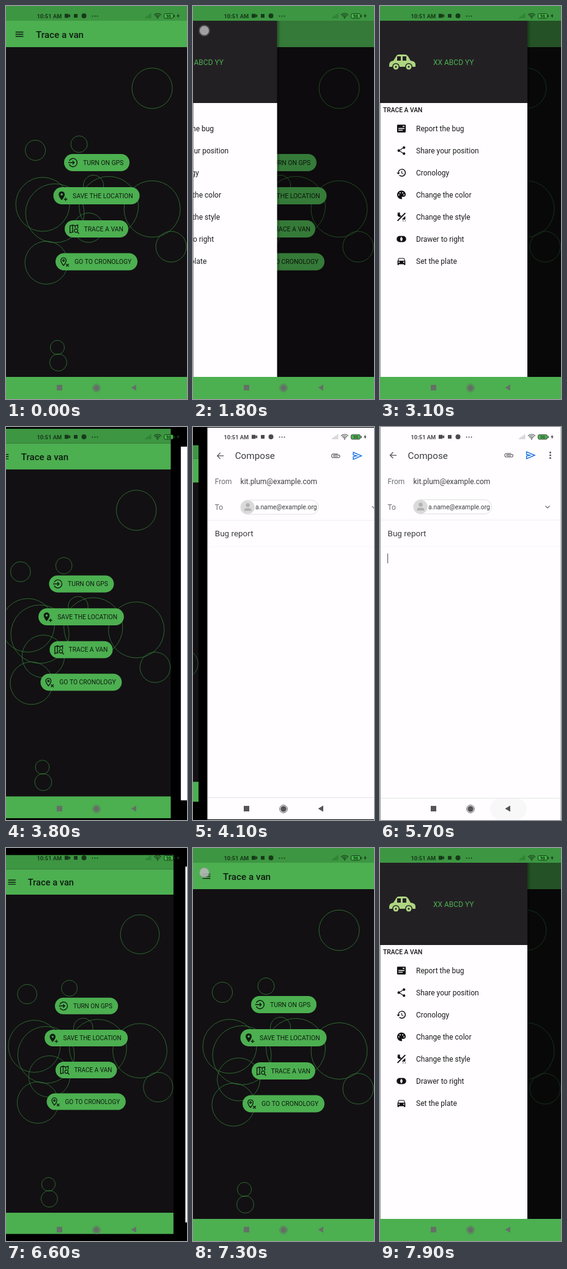
Animation, 296 px wide and 640 px high, one loop 8 s. Source, as an HTML page with a canvas:

```html
<!DOCTYPE html>
<html lang="en">
<head>
<meta charset="utf-8">
<title>Trace a van</title>
<style>
html, body { margin: 0; width: 100%; height: 100%; overflow: hidden; background: #000; }
canvas { display: block; width: 100vw; height: 100vh; }
</style>
</head>
<body>
<canvas></canvas>
<script>
const W = 296, H = 640, LOOP = 8000, STEP = 100;
const GREEN = '#4caf50', DARK = '#121013', INK = '#0f1c10';
const APP = 'Trace a van';
const canvas = document.querySelector('canvas');
const c = canvas.getContext('2d');
const ratio = Math.max(1, window.devicePixelRatio || 1);
canvas.width = W * ratio;
canvas.height = H * ratio;

const clamp = v => Math.min(1, Math.max(0, v));
const phase = (t, start, span) => clamp((t - start) / span);
const easeOut = (x, n) => 1 - (1 - x) ** n;
const smooth = x => x * x * (3 - 2 * x);

function rect(x, y, w, h, color) {
  c.fillStyle = color;
  c.fillRect(x, y, w, h);
}
function pill(x, y, w, h, r, fill, line) {
  c.beginPath();
  c.roundRect(x, y, w, h, r);
  if (fill) { c.fillStyle = fill; c.fill(); }
  if (line) { c.strokeStyle = line; c.lineWidth = 1; c.stroke(); }
}
function dot(x, y, r, color) {
  c.beginPath();
  c.arc(x, y, r, 0, 7);
  c.fillStyle = color;
  c.fill();
}
function ring(x, y, r, color, width = 1) {
  c.beginPath();
  c.arc(x, y, r, 0, 7);
  c.strokeStyle = color;
  c.lineWidth = width;
  c.stroke();
}
function text(s, x, y, size, color, weight = 400, align = 'left') {
  c.font = `${weight} ${size}px Roboto, sans-serif`;
  c.textAlign = align;
  c.fillStyle = color;
  c.fillText(s, x, y);
}
// Paths live in a 24-unit box centred on x, y.
function icon(d, x, y, size, color, line = 0) {
  c.save();
  c.translate(x - size / 2, y - size / 2);
  c.scale(size / 24, size / 24);
  const p = new Path2D(d);
  if (line) {
    c.strokeStyle = color;
    c.lineWidth = line;
    c.stroke(p);
  } else {
    c.fillStyle = color;
    c.fill(p, 'evenodd');
  }
  c.restore();
}

const ICON = {
  menu: 'M3 6h18v2H3zM3 11h18v2H3zM3 16h18v2H3z',
  back: 'M21 12H5M12 4l-8 8 8 8',
  chevron: 'M5 9l7 7 7-7',
  left: 'M15 5l-7 7 7 7',
  pin: 'M10 2a7 7 0 0 0-7 7c0 5.2 7 13 7 13s7-7.8 7-13a7 7 0 0 0-7-7zm0 9.5a2.5 2.5 0 1 1 0-5 2.5 2.5 0 0 1 0 5z',
  pinLine: 'M10 3a6 6 0 0 0-6 6c0 4.5 6 11.5 6 11.5s6-7 6-11.5a6 6 0 0 0-6-6zM10 7.5a1.8 1.8 0 1 0 .01 0z',
  plus: 'M15 20h8M19 16v8',
  cross: 'M16 17l6 6M22 17l-6 6',
  login: 'M3.5 8a9.5 9.5 0 1 1 0 8M1 12h14M11 8l4 4-4 4',
  map: 'M21 11V3l-6 2-6-2-6 2v16l6-2 2 1M9 3v16M15 5v5M17 12a4 4 0 1 0 .01 0zM20 19l4 4',
  report: 'M4 3h16a2 2 0 0 1 2 2v14a2 2 0 0 1-2 2H4a2 2 0 0 1-2-2V5a2 2 0 0 1 2-2zM5 11v2h14v-2zM5 15v2h10v-2zM15 6v2h4V6z',
  share: 'M18 16c-.8 0-1.4.3-2 .8l-7.1-4.1a3 3 0 0 0 0-1.4L16 7.2A3 3 0 1 0 15 5l.1.7L8 9.8a3 3 0 1 0 0 4.4l7.1 4.2-.1.6a3 3 0 1 0 3-3z',
  history: 'M13 3a9 9 0 0 0-9 9H1l3.9 3.9L9 12H6a7 7 0 1 1 2.1 4.9l-1.4 1.4A9 9 0 1 0 13 3zm-1 5v5l4.3 2.5.7-1.2-3.5-2.1V8z',
  palette: 'M12 2a10 10 0 0 0 0 20c1 0 1.7-.8 1.7-1.7 0-1-.9-1.2-.9-2.1 0-1 .8-1.7 1.7-1.7h2a5.5 5.5 0 0 0 5.5-5.5c0-5-4.5-9-10-9zM6 10.5a1.5 1.5 0 1 0 .01 0zM9 6a1.5 1.5 0 1 0 .01 0zM15 6a1.5 1.5 0 1 0 .01 0zM18 10.5a1.5 1.5 0 1 0 .01 0z',
  style: 'M20 2l2 2L4 22l-2-2zM9 2a5 5 0 1 0 3 8 6 6 0 0 1-3-8zM21 10v8h-8zM15 20h2v2h-2zM20 20h2v2h-2zM3 2h2v2H3z',
  compare: 'M8 5h8a7 7 0 0 1 0 14H8A7 7 0 0 1 8 5zM12 7a6 6 0 0 0 0 10 6 6 0 0 0 0-10z',
  car: 'M18.9 6c-.2-.6-.8-1-1.4-1h-11c-.7 0-1.2.4-1.4 1L3 12v8c0 .6.4 1 1 1h1c.6 0 1-.4 1-1v-1h12v1c0 .6.4 1 1 1h1c.6 0 1-.4 1-1v-8zM5 11l1.5-4.5h11L19 11zM6.5 13a1.5 1.5 0 1 0 .01 0zM17.5 13a1.5 1.5 0 1 0 .01 0z',
  clip: 'M17 7.5H6a4.5 4.5 0 0 0 0 9h12.5a3.2 3.2 0 0 0 0-6.5H8a1.8 1.8 0 0 0 0 3.6h9',
  send: 'M3 4l19 8-19 8v-6l8-2-8-2z',
  video: 'M2 5h14v5l6-4v12l-6-4v5H2z',
  bolt: 'M14 1L5 14h6l-1 9 9-13h-6z',
  shift: 'M12 2L2 13h5v8h10v-8h5z',
  erase: 'M8 4h14v16H8l-6-8zM11 9l6 6M17 9l-6 6',
  enter: 'M20 6v6H5M9 7l-5 5 5 5',
  mic: 'M12 2a3 3 0 0 0-3 3v7a3 3 0 0 0 6 0V5a3 3 0 0 0-3-3zM5 11h2a5 5 0 0 0 10 0h2a7 7 0 0 1-6 7v4h-2v-4a7 7 0 0 1-6-7z',
  board: 'M5 4h14v17H5zM9 2h6v4H9zM8 10h8M8 14h8M8 18h5',
  sticker: 'M3 3h18v11l-7 7H3zM21 14h-7v7M8 8v2M15 8v2M7 13q4 4 8 0',
  globe: 'M12 2a10 10 0 1 0 .01 0zM12 2q-9 10 0 20 9-10 0-20M3 9h18M3 15h18',
  smile: 'M12 2a10 10 0 1 0 .01 0zM8 8v2M16 8v2M7 14q5 6 10 0'
};

const BUBBLES = [
  [239, 134, 33], [48, 235, 16.5], [119.5, 225, 13.5], [143, 292, 16.5],
  [60, 323, 44], [80, 337.5, 48], [168, 326, 48.5], [239, 330.5, 46],
  [66, 418, 35], [270, 392, 25], [84, 556, 11.5], [85.5, 580.5, 14]
];
const BUTTONS = [
  [95, 255, 107, 'Turn on GPS', 126, ['login']],
  [77.5, 309, 141, 'Save the location', 109, ['pin', 'plus']],
  [96, 363, 104, APP, 127.5, ['map']],
  [81, 416.5, 134, 'Go to cronology', 112, ['pinLine', 'cross']]
];
const ITEMS = [
  ['report', 'Report the bug'], ['share', 'Share your position'],
  ['history', 'Cronology'], ['palette', 'Change the color'],
  ['style', 'Change the style'], ['compare', 'Drawer to right'],
  ['car', 'Set the plate']
];

// The app is paused while the mail screen covers it.
function driftingBubble(t) {
  const away = clamp((t - 3800) / 2800) * 2800;
  const k = Math.max(0, t - 600 - away) / 3200;
  return [135 - 49.5 * k, 361 + 13 * k, 24 + 11 * Math.min(k, 1)];
}

function drawHeader() {
  rect(0, 24, 241, 134, '#232024');
  const body = '#aed581';
  c.beginPath();
  c.moveTo(15, 98);
  c.quadraticCurveTo(14, 90, 22, 89);
  c.lineTo(27, 81);
  c.quadraticCurveTo(28, 79, 31, 79);
  c.lineTo(41, 79);
  c.quadraticCurveTo(44, 79, 46, 82);
  c.lineTo(50, 89);
  c.quadraticCurveTo(58, 90, 58, 95);
  c.lineTo(58, 99);
  c.lineTo(15, 99);
  c.fillStyle = body;
  c.fill();
  rect(28, 82, 6, 7, '#232024');
  rect(37, 82, 6, 7, '#232024');
  for (const x of [26, 47]) {
    dot(x, 99, 6, '#232024');
    dot(x, 99, 4.5, body);
    dot(x, 99, 1.5, '#232024');
  }
  text('XX ABCD YY', 87, 95.5, 12, GREEN);
}

function drawDrawer(open) {
  if (!open) return;
  rect(0, 24, W, 580, `rgba(0,0,0,${0.53 * open})`);
  c.save();
  c.beginPath();
  c.rect(0, 24, W, 580);
  c.clip();
  c.translate(241 * (open - 1), 0);
  const shade = c.createLinearGradient(241, 0, 247, 0);
  shade.addColorStop(0, 'rgba(0,0,0,.3)');
  shade.addColorStop(1, 'rgba(0,0,0,0)');
  rect(241, 24, 6, 580, shade);
  rect(0, 158, 241, 446, '#fffdff');
  drawHeader();
  text(APP.toUpperCase(), 5, 173, 10.3, '#151515', 500);
  ITEMS.forEach(([name, label], i) => {
    const y = 199.5 + 36 * i;
    icon(ICON[name], 35, y, 17, '#111');
    text(label, 59, y + 4, 12, '#1c1c1c');
  });
  c.restore();
  rect(0, 158, 1, 446, '#999');
}

function drawApp(t, open) {
  rect(0, 0, W, H, DARK);
  [...BUBBLES, driftingBubble(t)].forEach(b => ring(...b, '#37873b', 0.75));
  for (const [x, y, w, label, tx, parts] of BUTTONS) {
    pill(x, y - 14, w, 28, 14, GREEN);
    parts.forEach(p => icon(ICON[p], tx - 16.5, y, 17, INK, p === 'pin' ? 0 : 2));
    text(label.toUpperCase(), tx, y + 3.7, 10.4, INK);
  }
  rect(0, 24, W, 43, GREEN);
  icon(ICON.menu, 22, 46, 17, INK);
  text(APP, 49, 51.5, 15.2, INK, 500);
  drawDrawer(open);
  rect(0, 0, W, 24, '#3d9642');
  rect(0, 604, W, 36, GREEN);
}

const ROWS = [
  ['1234567890', '', 17, 445],
  ['QWERTYUIOP', '%\\|=[]<>{}', 17, 480],
  ['ASDFGHJKL', '@#$_&-+()', 31.5, 516],
  ['ZXCVBNM', '*"\':;!?', 60, 552]
];

function drawKeyboard(up) {
  if (!up) return;
  const pale = '#bcd4f2';
  c.save();
  c.beginPath();
  c.rect(0, 0, W, 604);
  c.clip();
  c.translate(0, 218 * (1 - up));
  rect(0, 386, W, 218, '#1565c0');
  rect(0, 386, W, 34, '#0d47a1');
  dot(19, 403, 11.5, '#fff');
  icon(ICON.left, 19, 403, 13, '#123f86', 2.5);
  icon(ICON.sticker, 58, 403, 14, pale, 2.2);
  text('GIF', 100, 406.5, 10.5, pale, 700, 'center');
  icon(ICON.board, 143, 403, 15, pale, 2.2);
  for (let i = 0; i < 8; i++) {
    const a = i * Math.PI / 4;
    dot(185.5 + 4.7 * Math.cos(a), 403 + 4.7 * Math.sin(a), 1.6, pale);
  }
  ring(185.5, 403, 3.5, pale, 2.6);
  rect(211, 394, 1, 18, 'rgba(255,255,255,.15)');
  for (const x of [233, 238, 243]) dot(x, 403, 1.5, pale);
  icon(ICON.mic, 280, 402.5, 16, pale);
  for (const [keys, hints, x0, y] of ROWS) {
    [...keys].forEach((key, i) => {
      const x = x0 + 29.1 * i;
      text(key, x, y, 17, '#fff', 400, 'center');
      if (hints) text(hints[i], x + 8.5, y - 13, 9, '#dbe7f8', 400, 'center');
    });
  }
  icon(ICON.shift, 24, 546, 18, pale);
  icon(ICON.erase, 271, 546, 19, pale, 2);
  text('?123', 11.5, 586, 11, pale, 500);
  icon(ICON.smile, 60.5, 576, 9, pale, 2);
  text(',', 60.5, 589, 13, pale, 500, 'center');
  icon(ICON.globe, 89, 582, 17, pale, 1.7);
  pill(111, 573, 102, 19, 2, 'rgba(255,255,255,.45)');
  text('EN • HR • IT', 162, 586, 9.5, '#fff', 400, 'center');
  text('.', 235, 587, 14, pale, 500, 'center');
  pill(256, 571.5, 32, 22, 11, '#2196f3');
  icon(ICON.enter, 272, 582.5, 15, '#fff', 2.4);
  c.restore();
}

function drawMail(t, keys) {
  const gray = '#6b6e73', ink = '#3c3d41';
  rect(0, 0, W, H, '#fffdff');
  if (t < 3900) return; // the window opens blank
  icon(ICON.back, 21.5, 46, 15, '#555', 2);
  text('Compose', 45.5, 51.5, 15.3, ink);
  icon(ICON.clip, 211, 46, 16, '#666', 1.7);
  icon(ICON.send, 246, 46, 17, '#1a73e8', 2);
  for (const y of [41.5, 46, 50.5]) dot(278.5, y, 1.5, '#555');
  text('From', 12.5, 92.5, 12, gray);
  text('kit.plum@example.com', 54.5, 92.5, 12, ink);
  text('To', 12.5, 134.5, 12, gray);
  pill(54.5, 118.5, 128, 23, 11.5, '#fff', '#dfdfdf');
  dot(66.5, 130, 11.3, '#dadada');
  dot(66.5, 126.5, 3.2, '#b2b2b2');
  pill(60.5, 131.5, 12, 4.5, [4, 4, 0, 0], '#b2b2b2');
  text('a.name@example.org', 79, 133.5, 10.4, ink);
  icon(ICON.chevron, 274, 130, 12, '#666', 2.4);
  rect(0, 151, W, 1, '#f0f0f0');
  text('Bug report', 12.5, 178, 13.5, ink);
  rect(0, 194, W, 1, '#f7f7f7');
  if (Math.floor((t - 4400) / 500) % 2 === 0) rect(12, 206, 1.2, 16, '#666');
  rect(0, 604, W, 1, '#e4e4e4');
  if (t >= 5300) pill(180, 605, 60, 34, 17, '#f9f8f9');
  drawKeyboard(keys);
  if (keys > 0.3) rect(0, 604, W, 36, '#050505');
  rect(0, 0, 1, H, '#999');
  rect(W - 1, 0, 1, H, '#bbb');
}

function drawStatus(light) {
  const ink = light ? '#4c4c4c' : '#173a1a';
  const faint = light ? '#c4c4c4' : '#2b7a30';
  text('10:51 AM', 50.5, 19.5, 9.3, ink, 600);
  icon(ICON.video, 100.5, 16, 11, ink);
  rect(111, 13, 6, 6, ink);
  dot(127.5, 16, 4, ink);
  for (const x of [141.5, 145.5, 149.5]) dot(x, 16.5, 1, ink);
  for (let i = 0; i < 5; i++) rect(227.5 + 2.1 * i, 18 - 1.5 * i, 1.3, 2 + 1.5 * i, faint);
  for (const r of [3, 5.5, 8]) {
    c.beginPath();
    c.arc(248, 20, r, -2.4, -0.75);
    c.strokeStyle = ink;
    c.lineWidth = 1.2;
    c.stroke();
  }
  dot(248, 19.5, 1.1, ink);
  pill(258.5, 12.5, 15, 7.5, 2, '#43b648', ink);
  rect(274.5, 14.5, 1.5, 3.5, ink);
  text('96', 266, 19, 7, ink, 700, 'center');
  icon(ICON.bolt, 281.5, 16, 8, ink);
}

function drawNav(color) {
  rect(83, 617, 9, 9, color);
  dot(148, 622, 4.8, color);
  ring(148, 622, 6.3, color, 1);
  c.beginPath();
  c.moveTo(204.5, 621.5);
  c.lineTo(213, 616.5);
  c.lineTo(213, 626.5);
  c.fillStyle = color;
  c.fill();
}

function drawTouch(t, start, x, y) {
  if (t < start || t > start + 200) return;
  dot(x, y, 9.5, 'rgba(150,150,150,.35)');
  dot(x, y, 7.5, 'rgba(190,190,190,.75)');
}

function card(shift, scale, draw) {
  c.save();
  c.translate(W / 2 + shift, H / 2);
  c.scale(scale, scale);
  c.translate(-W / 2, -H / 2);
  c.beginPath();
  c.rect(0, 0, W, H);
  c.clip();
  draw();
  c.restore();
}

function drawScene(t) {
  const enter = easeOut(phase(t, 3784, 550), 3);
  const leaveTime = phase(t, 6200, 650);
  const leave = easeOut(leaveTime, 3);
  const slide = enter - leave;
  const closing = t >= 6200;
  const open = easeOut(phase(t, 1730, 450), 5)
    - easeOut(phase(t, 3350, 350), 3)
    + easeOut(phase(t, 7400, 450), 5);
  const keys = easeOut(phase(t, 4250, 350), 3) - smooth(phase(t, 5250, 350));
  const appScale = closing ? Math.min(1, 0.9 + 0.105 * leaveTime) : 1 - 0.1 * enter;
  const mailScale = closing ? 1 - 0.1 * leave : 0.9 + 0.1 * smooth(clamp((enter - 0.3) / 0.7));

  c.setTransform(ratio, 0, 0, ratio, 0, 0);
  rect(0, 0, W, H, '#000');
  if (slide < 1) card(-W * slide, appScale, () => drawApp(t, open));
  if (slide > 0) card(W * (1 - slide), mailScale, () => drawMail(t, keys));

  const mailFront = slide > 0.5;
  drawStatus(mailFront);
  drawNav(!mailFront ? '#647067' : keys > 0.3 ? '#a6a6a6' : '#555');
  drawTouch(t, 1600, 18.5, 40);
  drawTouch(t, 3150, 95, 199);
  drawTouch(t, 7250, 18.5, 40);
}

function tick(now) {
  drawScene(Math.floor((now % LOOP) / STEP) * STEP);
  requestAnimationFrame(tick);
}
requestAnimationFrame(tick);
</script>
</body>
</html>
```
